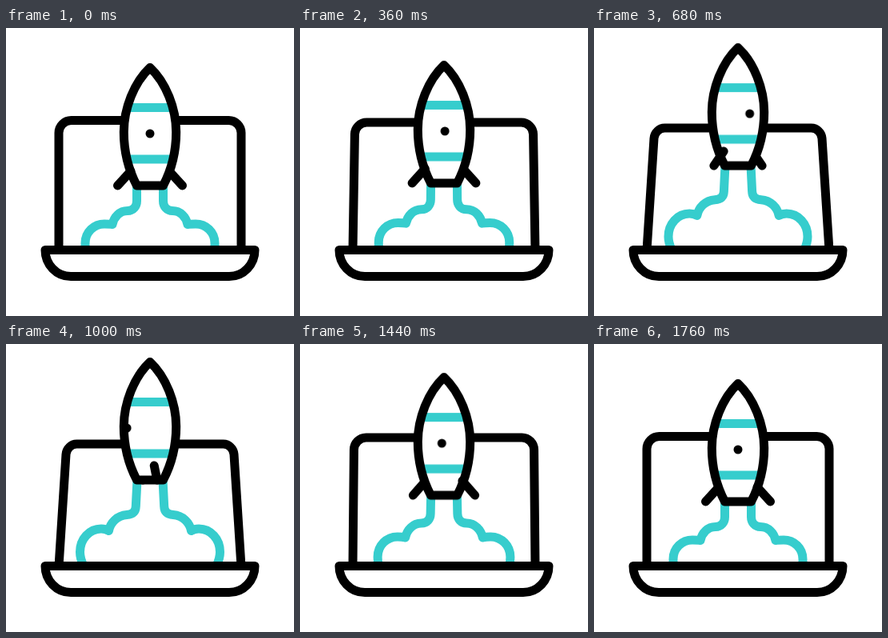
Write an HTML page without scripts that moves like this. It is 360 px wide and 360 px high and loops after 2000 ms.

```html
<!DOCTYPE html>
<html lang="en">
<head>
<meta charset="utf-8">
<title>Rocket launch</title>
<style>
  html, body { margin: 0; height: 100%; overflow: hidden; background: #fff; }
  svg { display: block; width: 100vw; height: 100vh; }

  .line { fill: none; stroke: #000; stroke-width: 11; stroke-linejoin: round; stroke-linecap: round; }
  .teal { stroke: #36cdcd; stroke-linecap: butt; }
  .solid { fill: #fff; }

  .screen, .smoke, .rocket, .window, .fin { animation: 2s linear infinite; }
  .screen { animation-name: tilt; }
  .smoke { animation-name: billow; }
  .rocket { animation-name: lift; }
  .window { animation-name: spin; }
  .front { animation-name: sweep-right; }
  .back { animation-name: sweep-left; }

  @keyframes tilt {
    0%, 7% {
      d: path("M66 278L66 131C66 122.5 73 115.5 81.5 115.5L278.5 115.5C287 115.5 294 122.5 294 131L294 278");
      animation-timing-function: cubic-bezier(.65, 0, .35, 1);
    }
    34%, 50% {
      d: path("M66 278L75 138C75.5 131 81.5 125 88.5 125L271.5 125C278.5 125 284.5 131 285 138L294 278");
      animation-timing-function: cubic-bezier(.37, 0, .63, 1);
    }
    80%, 100% {
      d: path("M66 278L66 131C66 122.5 73 115.5 81.5 115.5L278.5 115.5C287 115.5 294 122.5 294 131L294 278");
    }
  }

  @keyframes billow {
    0%, 7%, 88%, 100% {
      d: path("M163.5 197L163.5 216C163.5 223 159 228.5 152 228.5C142 228.5 135 236 133 245.5C130 245 127 245 123 245C110 245 99 255 99 269C99 272 99 275 99 278");
      animation-timing-function: cubic-bezier(.65, 0, .35, 1);
    }
    43.5%, 50% {
      d: path("M164 170L162.3 203C162 210 158 213 151 213.5C139 214.5 130.5 223 128.5 233.5C126 232 123 231 119 231C104 231 92.5 244 92.5 260C92.5 267 94 271 97 277");
      animation-timing-function: cubic-bezier(.65, 0, .35, 1);
    }
  }

  @keyframes lift {
    0%, 7%, 88%, 100% { transform: translateY(0); animation-timing-function: cubic-bezier(.65, 0, .35, 1); }
    43.5%, 50% { transform: translateY(-27px); animation-timing-function: cubic-bezier(.65, 0, .35, 1); }
  }

  /* The window leaves on the right edge and returns on the left. */
  @keyframes spin {
    0%, 12% { transform: translateX(0); animation-timing-function: cubic-bezier(.12, 0, .39, 0); }
    47.5% { transform: translateX(33px); }
    47.51% { transform: translateX(-33px); animation-timing-function: cubic-bezier(.61, 1, .88, 1); }
    80.5%, 100% { transform: translateX(0); }
  }

  @keyframes sweep-right {
    0%, 11.5% { d: path("M156 179L139.5 197"); animation-timing-function: cubic-bezier(.65, 0, .35, 1); }
    83%, 100% { d: path("M204 179L220.5 197"); }
  }
  @keyframes sweep-left {
    0%, 11.5% { d: path("M204 179L220.5 197"); animation-timing-function: cubic-bezier(.65, 0, .35, 1); }
    83%, 100% { d: path("M156 179L139.5 197"); }
  }
</style>
</head>
<body>
<svg viewBox="0 0 360 360">
  <defs>
    <path id="hull" d="M180 49.5C160 68 147.3 101 147.3 130C147.3 156 153 177 163.5 197H196.5C207 177 212.7 156 212.7 130C212.7 101 200 68 180 49.5Z"/>
  </defs>

  <path class="line screen"/>
  <path class="line teal smoke"/>
  <g transform="matrix(-1 0 0 1 360 0)"><path class="line teal smoke"/></g>
  <path class="line solid" d="M49 277.5H311C311 295.7 296.8 310.5 279 310.5H81C63.2 310.5 49 295.7 49 277.5Z"/>

  <g class="rocket">
    <path class="line fin back"/>
    <use class="solid" href="#hull"/>
    <path class="line teal" d="M154 99.5H206M153 164H207"/>
    <use class="line" href="#hull"/>
    <circle class="window" cx="180" cy="132" r="5.5"/>
    <path class="line fin front"/>
  </g>
</svg>
</body>
</html>
```
